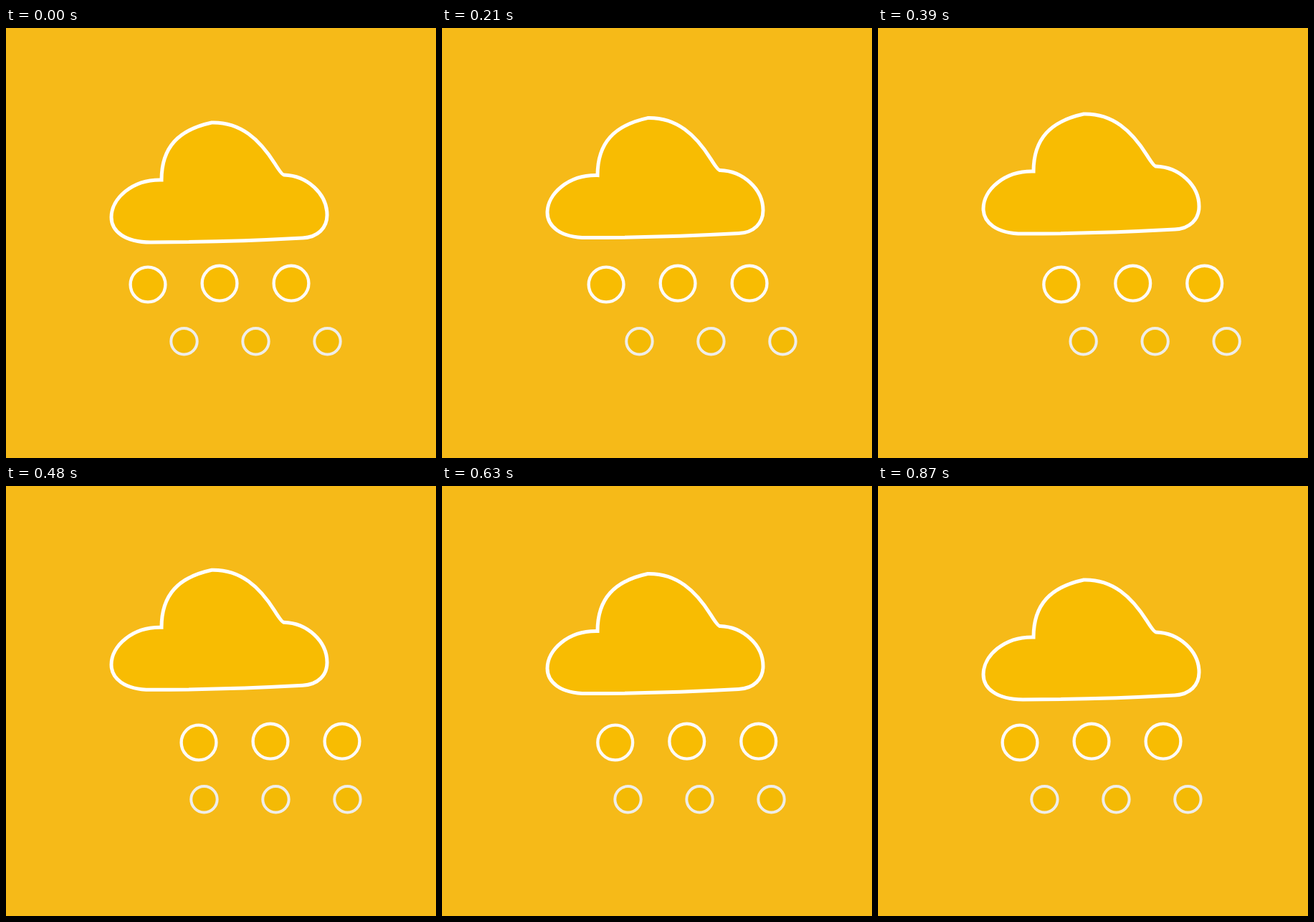
An HTML page that plays this animation: 600x600 px, repeating every 0.9 s.

```html
<!DOCTYPE html>
<html lang="en">
<head>
<meta charset="utf-8">
<title>Snow cloud</title>
<style>
  html, body { margin: 0; width: 100%; height: 100%; overflow: hidden; background: #f6ba18; }
  svg { display: block; width: 100vw; height: 100vh; }
</style>
</head>
<body>
<svg viewBox="0 0 600 600">
  <path id="cloud" fill="#f8bc02" stroke="#fff" stroke-width="5"
    d="M217 212C217 166 241 142 287 132C328 131 354 156 375 189Q385 205 388 205C420 206 448 231 448 261C448 279 435 292 414 293C340 297 270 299 202 299C165 299 147 283 147 264C147 238 176 211 217 212Z"/>
  <g id="big" fill="#f8bc02" stroke="#fdfaf6" stroke-width="4.4">
    <circle cx="0" cy="358" r="24.4"/>
    <circle cx="100" cy="356.2" r="24.4"/>
    <circle cx="200" cy="356.2" r="24.4"/>
  </g>
  <g id="small" fill="#f4ba05" stroke="#efede8" stroke-width="4">
    <circle cx="0" cy="437.3" r="18.2"/>
    <circle cx="100" cy="437.3" r="18.2"/>
    <circle cx="200" cy="437.3" r="18.2"/>
  </g>
</svg>
<script>
const LOOP = 900, STEP = 30;
const [cloud, big, small] = ["cloud", "big", "small"].map(id => document.getElementById(id));

// Linear track through [time, value] keys, held at both ends
function track(t, keys) {
  if (t <= keys[0][0]) return keys[0][1];
  for (let i = 1; i < keys.length; i++) {
    const [t0, v0] = keys[i - 1], [t1, v1] = keys[i];
    if (t <= t1) return v0 + (v1 - v0) * (t - t0) / (t1 - t0);
  }
  return keys[keys.length - 1][1];
}

function move(el, x, y) {
  el.setAttribute("transform", `translate(${x.toFixed(2)} ${y.toFixed(2)})`);
}

function draw(ms) {
  const t = Math.floor((ms % LOOP) / STEP + 0.001) * STEP;
  move(cloud, 0, track(t, [[0, 0], [480, -14.7], [900, 0]]));
  move(big, track(t, [[0, 198], [480, 269], [870, 198]]), 0);
  move(small, track(t, [[30, 248.5], [330, 293.4], [870, 232.4]]), 0);
}

let start;
function tick(now) {
  start ??= now;
  draw(Math.max(0, now - start));
  requestAnimationFrame(tick);
}
draw(0);
requestAnimationFrame(tick);
</script>
</body>
</html>
```
